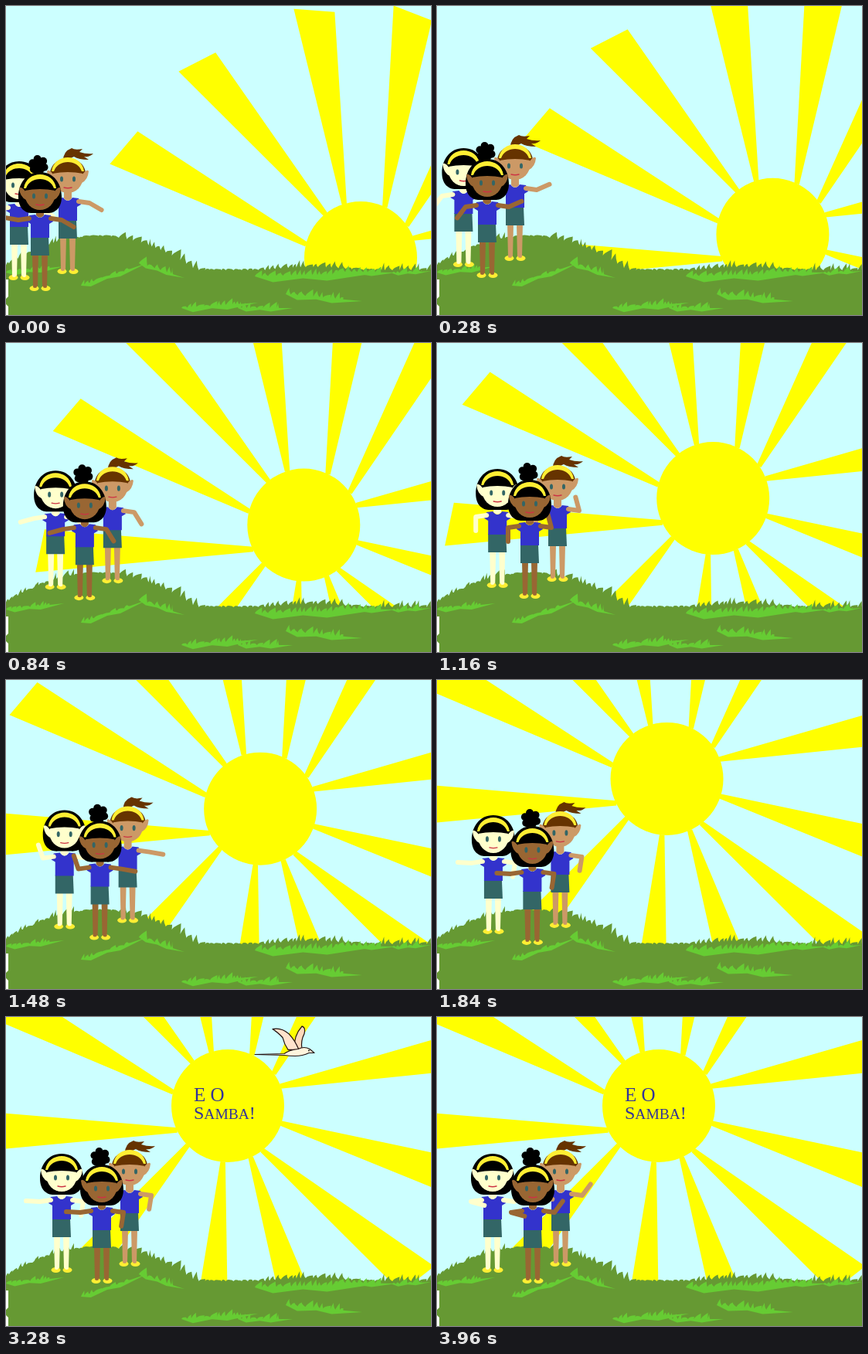
Animation of 550x400 px, one loop 4000 ms. Source, as an HTML page with a canvas:

```html
<!DOCTYPE html>
<html lang="pt">
<head>
<meta charset="utf-8">
<title>E o samba!</title>
<style>
html, body { margin: 0; width: 100%; height: 100%; overflow: hidden; background: #cff; }
canvas { display: block; }
</style>
</head>
<body>
<canvas id="stage" width="550" height="400"></canvas>
<script>
const ctx = document.getElementById('stage').getContext('2d');
const LOOP = 4000, STEP = 40, ARRIVE = 1960, BEAT = 480;
const SUN_RADIUS = 73;

// Where each ray leaves the disc, and where it points, in degrees.
const RAYS = [
  [194, 208], [231, 230], [253, 261.3], [295.5, 278.3], [325, 299.3], [339.5, 349],
  [18.2, 17], [52.2, 39.8], [66, 72.3], [95, 94.2], [135.5, 130], [154.3, 179.7]
];

// Path of the girl in front, as [time, x, y]; the others keep their distance to her.
const WALK = [[0, 44, 244], [560, 86, 210], [1160, 120, 206], [ARRIVE, 124, 220]];

// Angles of the left and right forearm over one beat.
const DANCE = [[0, 190, 30], [80, 312, -10], [160, 440, -97], [200, 450, -105], [400, 543, 99], [480, 550, 30]];

const GIRLS = [
  { skin: '#cc9966', hair: '#663300', tail: true, dx: 36, dy: -22, spread: 0 },
  { skin: '#ffffcc', hair: '#000', dx: -27, dy: -14, spread: -25 },
  { skin: '#996633', hair: '#000', bun: true, dx: 0, dy: 0, spread: 0 }
];

const polar = (degrees, r) => [r * Math.cos(degrees * Math.PI / 180), r * Math.sin(degrees * Math.PI / 180)];
const bump = (x, centre, half) => Math.max(0, 1 - ((x - centre) / half) ** 2);

function sample(keys, t) {
  const next = keys.findIndex(key => key[0] > t);
  if (next < 0) return keys[keys.length - 1].slice(1);
  const a = keys[next - 1], b = keys[next];
  const k = (t - a[0]) / (b[0] - a[0]);
  return a.slice(1).map((v, i) => v + (b[i + 1] - v) * k);
}

function fill(path, color) {
  ctx.fillStyle = color;
  ctx.fill(new Path2D(path));
}

function stroke(path, color, width) {
  ctx.strokeStyle = color;
  ctx.lineWidth = width;
  ctx.stroke(new Path2D(path));
}

function oval(x, y, rx, ry, color) {
  ctx.fillStyle = color;
  ctx.beginPath();
  ctx.ellipse(x, y, rx, ry, 0, 0, 7);
  ctx.fill();
}

let seed = 11;
const random = () => (seed = seed * 16807 % 2147483647) / 2147483647;

// Curved blades of grass along the curve y(x).
function blades(from, to, y, height) {
  let d = '';
  for (let x = from; x < to;) {
    const end = Math.min(to, x + 4 + 7 * random());
    const tip = x + (end - x) * (0.5 + 0.6 * random());
    const top = y(x) - height(x) * (0.15 + 0.85 * random());
    d += `L${x} ${y(x)}Q${x + 1} ${y(x) - 3} ${tip} ${top}Q${tip} ${y(x) - 2} ${end} ${y(end)}`;
    x = end;
  }
  return d;
}

const surface = x => 342 - 44 * bump(x, 118, 128) - 4 * bump(x, 395, 60);
const flat = x => (x > 85 && x < 145) || (x > 250 && x < 325) || (x > 442 && x < 482);
const ground = 'M0 400' + blades(0, 550, surface, x => flat(x) ? 2 : 10) + 'L550 400Z';

function patch([x0, y0, x1, y1]) {
  const line = x => y0 + (y1 - y0) * (x - x0) / (x1 - x0);
  const width = x1 - x0, belly = Math.min(8, width / 16);
  return `M${x0} ${y0}` + blades(x0, x0 + width * 0.75, line, () => 9) + `L${x1} ${y1}`
    + `L${x0 + width * 0.6} ${line(x0 + width * 0.6) + belly}L${x0 + width * 0.4} ${line(x0 + width * 0.4) + belly * 0.5}`
    + `L${x0 + width * 0.15} ${line(x0 + width * 0.15) + belly}Z`;
}

const lightGrass = [
  [97, 362, 182, 333], [172, 333, 231, 352], [0, 345, 75, 337],
  [322, 350, 478, 346], [425, 344, 505, 345], [500, 346, 550, 343],
  [362, 373, 461, 382], [227, 391, 326, 384], [300, 391, 371, 391]
].map(patch).join('');

function drawGround() {
  fill(ground, '#669933');
  fill(lightGrass, '#66cc33');
  fill('M0 354H3V376L0 379ZM0 386L3 389V400H0Z', '#fff');
}

function drawRay([root, aim]) {
  const [x, y] = polar(root, SUN_RADIUS - 0.5);
  const length = 255 + 22 * Math.cos(aim * Math.PI / 180) ** 4;
  const corner = (side, reach) => {
    const [ox, oy] = polar(aim + side * 90, 3.2);
    const [rx, ry] = polar(aim + side * 5.1, reach);
    ctx.lineTo(x + ox + rx, y + oy + ry);
  };
  ctx.beginPath();
  corner(-1, 0);
  corner(-1, length + 6);
  corner(1, length - 6);
  corner(1, 0);
  ctx.fill();
}

function drawSun(t) {
  const k = Math.min(1, t / ARRIVE);
  ctx.save();
  ctx.translate(459 - 172 * k, 326 - 211 * k);
  oval(0, 0, SUN_RADIUS, SUN_RADIUS, '#ff0');
  RAYS.forEach(drawRay);
  ctx.restore();
}

function drawHair({ hair, tail, bun }) {
  if (tail) {
    fill('M-23 -2C-25 -32 25 -32 23 -2Z', hair);
    fill('M-6 -22Q-6 -34 5 -38Q9 -35 19 -37L15 -33Q24 -30 33 -31Q28 -26 21 -27L27 -23Q14 -23 8 -27Q2 -25 0 -20Z', hair);
    return;
  }
  fill('M0 -29C18 -29 28 -14 28 3C28 19 18 25 8 24H-8C-18 25 -28 19 -28 3C-28 -14 -18 -29 0 -29Z', hair);
  if (bun) {
    for (let i = 0; i < 6; i++) {
      const [x, y] = polar(i * 60 + 20, 8);
      oval(x - 2, y - 38, 5, 5, hair);
    }
    oval(-2, -35, 8, 10, hair);
  }
}

function drawArm(side, angle, color) {
  const x = side * 14, elbow = x + side * 14;
  const [hx, hy] = polar(angle, 18);
  stroke(`M${x} 31L${elbow} 33L${elbow + hx} ${33 + hy}`, color, 6);
}

function drawGirl(girl, t) {
  const { skin, hair, dx, dy, spread } = girl;
  const [x, y] = sample(WALK, t);
  const [left, right] = sample(DANCE, t % BEAT);
  ctx.save();
  ctx.translate(x + dx + spread * Math.min(1, t / ARRIVE), y + dy);
  ctx.lineCap = ctx.lineJoin = 'round';

  fill('M-10 77H-2L-3 120H-9ZM2 77H10L9 120H3Z', skin);
  for (const side of [-1, 1]) {
    oval(side * 7.5, 121.5, 6, 3.5, '#ffee33');
    oval(side * 6.5, 119, 2.6, 2, skin);
  }
  fill('M-12 55H11L12 79H-12Z', '#336666');
  fill('M-14 27L-6 26Q0 34 6 26L14 27L17 35L12 38V56H-12V38L-17 35Z', '#3333cc');
  fill('M-5 17H5V27Q0 33 -5 27Z', skin);
  drawArm(-1, left, skin);
  drawArm(1, right, skin);

  drawHair(girl);
  fill('M-18 -3Q-25 -12 -27 -8Q-26 3 -18 7ZM18 -3Q25 -12 27 -8Q26 3 18 7Z', skin);
  oval(0, 0, 19.5, 20, skin);
  fill('M-20 -5C-19 -29 19 -29 20 -5Q0 -9 -20 -5Z', hair);
  fill('M-21 -8C-18 -32 18 -32 21 -8L18 -8C13 -24 -13 -24 -18 -8Z', '#ffee33');
  oval(-8, 2, 2, 3.6, '#336666');
  oval(8, 2, 2, 3.6, '#336666');
  stroke('M-5 13Q0 14.5 5 13', '#cc3344', 1.4);
  ctx.restore();
}

function drawBird(t) {
  const flight = t - 2560;
  const lift = 1.1 - 0.14 * Math.cos((t - 2680) / 427 * 2 * Math.PI);
  const part = (d, color) => {
    fill(d, color);
    stroke(d, '#221111', 1.2);
  };
  ctx.save();
  ctx.translate(76 + flight * 0.3417, 77.5 - flight * 0.0403);
  ctx.lineJoin = 'round';
  ctx.save();
  ctx.scale(1, lift);
  part('M51 -5Q50 -20 61 -30Q66 -29 64 -22Q59 -14 61 -6Z', '#ffd9bb');
  part('M43 -5Q38 -11 36 -18Q29 -24 23 -27Q34 -29 44 -22Q52 -15 57 -5Z', '#ffe3cc');
  ctx.restore();
  part('M0 0L38 -1Q45 -6 56 -7Q64 -11 71 -7L77 -2L70 -2Q62 2 52 2Q44 2 38 1Z', '#fff5dd');
  oval(70, -5, 0.9, 0.9, '#000');
  ctx.restore();
}

function drawText() {
  const write = (text, size, x, y) => {
    ctx.font = `${size}px "Liberation Serif", serif`;
    ctx.fillText(text, x, y);
    return x + ctx.measureText(text).width;
  };
  ctx.fillStyle = '#333399';
  write('E O', 25, 243, 108.5);
  let x = write('S', 24, 243, 132);
  x = write('AMBA', 19.5, x, 132);
  write('!', 24, x, 132);
}

function draw(t) {
  ctx.fillStyle = '#ccffff';
  ctx.fillRect(0, 0, 550, 400);
  drawSun(t);
  drawGround();
  GIRLS.forEach(girl => drawGirl(girl, t));
  if (t >= ARRIVE) {
    drawText();
    drawBird(t);
  }
}

const start = performance.now();
function tick() {
  const t = (performance.now() - start) % LOOP;
  draw(Math.floor(t / STEP) * STEP);
  requestAnimationFrame(tick);
}
tick();
</script>
</body>
</html>
```
